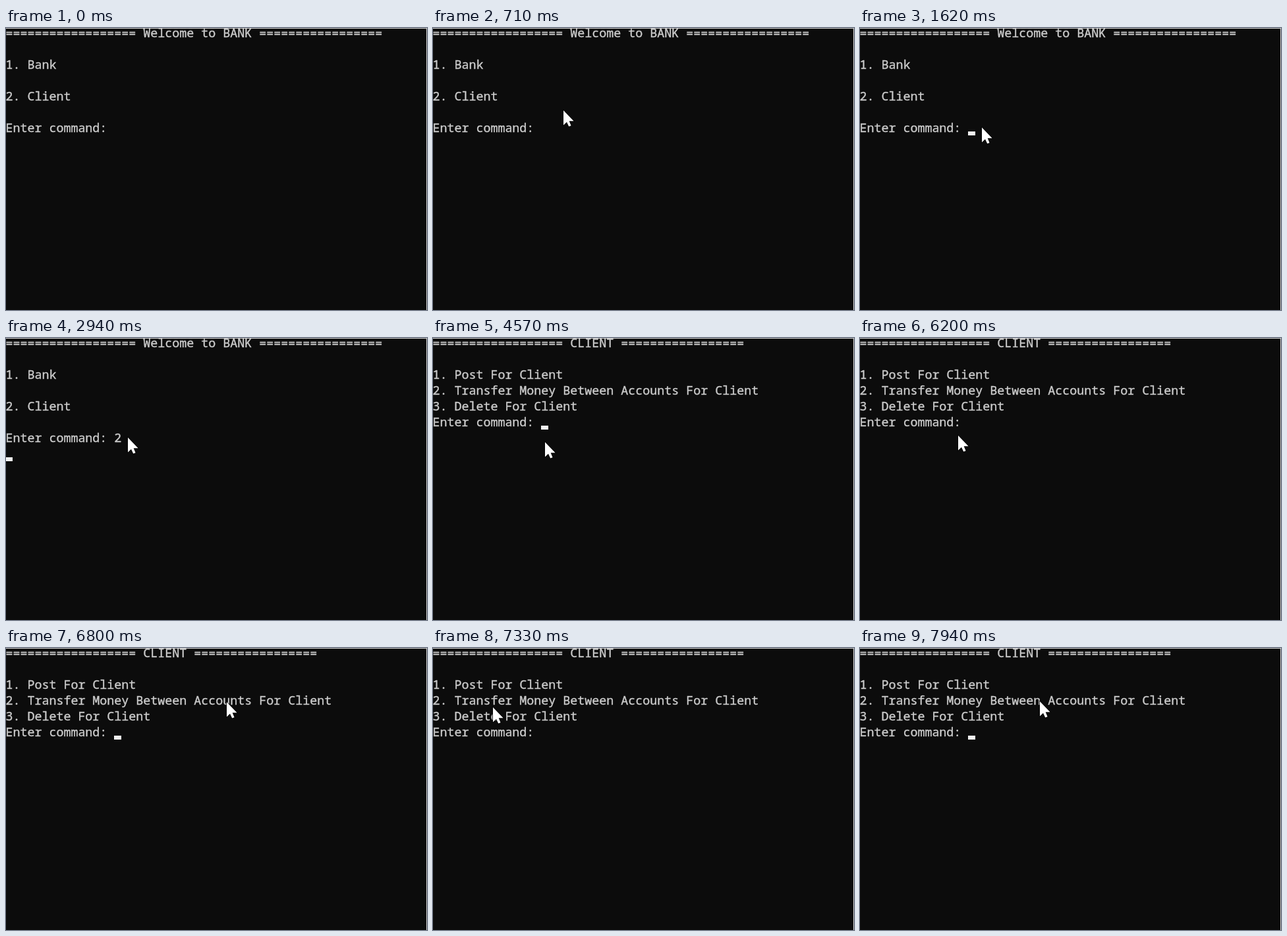
An HTML page that plays this animation: 639 px wide and 428 px high, repeating every 8000 ms.

```html
<!DOCTYPE html>
<html lang="en">
<head>
<meta charset="utf-8">
<title>Console menu</title>
<style>
  html, body { margin: 0; width: 100%; height: 100%; overflow: hidden; background: #0c0c0c; }
  svg { display: block; width: 639px; height: 428px; }
  text {
    font: 18.333px "Noto Sans Mono", "DejaVu Sans Mono", monospace;
    fill: #ccc; stroke: #ccc; stroke-width: .4; white-space: pre;
  }
</style>
</head>
<body>
<svg viewBox="0 0 639 428">
  <rect width="639" height="428" fill="#0c0c0c"/>
  <g id="home"></g>
  <g id="client"></g>
  <rect id="caret" width="11" height="6" fill="#f2f2f2"/>
  <path d="M0 .5H639M638.5 0V428" stroke="#d0d0d0" fill="none"/>
  <path id="mouse" d="M0 0V22.5L5 17.8L8.2 24.6L11.6 23.2L8.7 16.3H15.6Z"
        fill="#fff" stroke="#000" stroke-width="1.4" paint-order="stroke"/>
</svg>
<script>
const LOOP = 8000, TICK = 68, BLINK = 530, CELL = 11, ROW = 24, BOW = 0.16;
const SHOWN = 1620, TYPED = 2550, ENTERED = 2940, SWITCHED = 3030, RESUMED = 3230;

const $ = id => document.getElementById(id);
const home = $('home'), client = $('client'), caret = $('caret'), mouse = $('mouse');
const bar = title => '='.repeat(18) + ` ${title} ` + '='.repeat(17);

function addLine(group, row, str) {
  const el = document.createElementNS('http://www.w3.org/2000/svg', 'text');
  el.setAttribute('x', -0.6);
  el.setAttribute('y', 14 + row * ROW);
  el.textContent = str;
  group.append(el);
  return el;
}

const addLines = (group, lines) => lines.map((s, row) => addLine(group, row, s));

const prompt = addLines(home,
  [bar('Welcome to BANK'), '', '1. Bank', '', '2. Client', '', '']).pop();
addLines(client, [bar('CLIENT'), '', '1. Post For Client',
  '2. Transfer Money Between Accounts For Client', '3. Delete For Client', 'Enter command: ']);

const blinkOn = (t, since) => Math.floor(Math.max(0, t - since) / BLINK) % 2 === 0;

// Caret as [column, row], or null while it is hidden.
function caretAt(t) {
  if (t < SHOWN || !blinkOn(t, t < SWITCHED ? SHOWN : RESUMED)) return null;
  if (t >= SWITCHED) return [15, 5];
  if (t >= ENTERED) return [0, 7];
  return [t < TYPED ? 15 : 16, 6];
}

// Turning points of the pointer: time, x, y
const turns = [
  [70, 546, 393], [614, 205, 116], [820, 178, 133], [1160, 185, 151], [4220, 185, 151],
  [4424, 204, 164], [4570, 170, 158], [4774, 145, 172], [5254, 139, 180], [5580, 170, 152],
  [5850, 441, 112], [6328, 34, 90], [6800, 335, 82], [6936, 395, 130], [7072, 300, 181],
  [7276, 91, 90], [7672, 422, 95], [7940, 273, 81]
];

// The pointer swings from turn to turn in clockwise arcs, one step per tick.
function pointerAt(t) {
  const i = turns.findLastIndex(p => p[0] <= t);
  const [t0, x0, y0] = turns[i];
  const [t1, x1, y1] = turns[i + 1] || [LOOP, x0, y0];
  const u = Math.floor((t - t0) / TICK) * TICK / (t1 - t0);
  const bow = BOW * Math.sin(Math.PI * u);
  const dx = x1 - x0, dy = y1 - y0;
  return [x0 + dx * u + dy * bow, y0 + dy * u - dx * bow].map(Math.round);
}

const show = (el, on) => el.setAttribute('visibility', on ? 'visible' : 'hidden');
const move = (el, x, y) => el.setAttribute('transform', `translate(${x} ${y})`);

function draw(t) {
  show(home, t < SWITCHED);
  show(client, t >= SWITCHED);
  prompt.textContent = 'Enter command: ' + (t >= TYPED ? '2' : '');

  const spot = caretAt(t);
  show(caret, spot);
  if (spot) move(caret, spot[0] * CELL - 1, 13 + spot[1] * ROW);

  const entered = t >= turns[0][0];
  show(mouse, entered);
  if (entered) move(mouse, ...pointerAt(t));
}

const start = performance.now();
function frame() {
  draw((performance.now() - start) % LOOP);
  requestAnimationFrame(frame);
}
frame();
</script>
</body>
</html>
```
